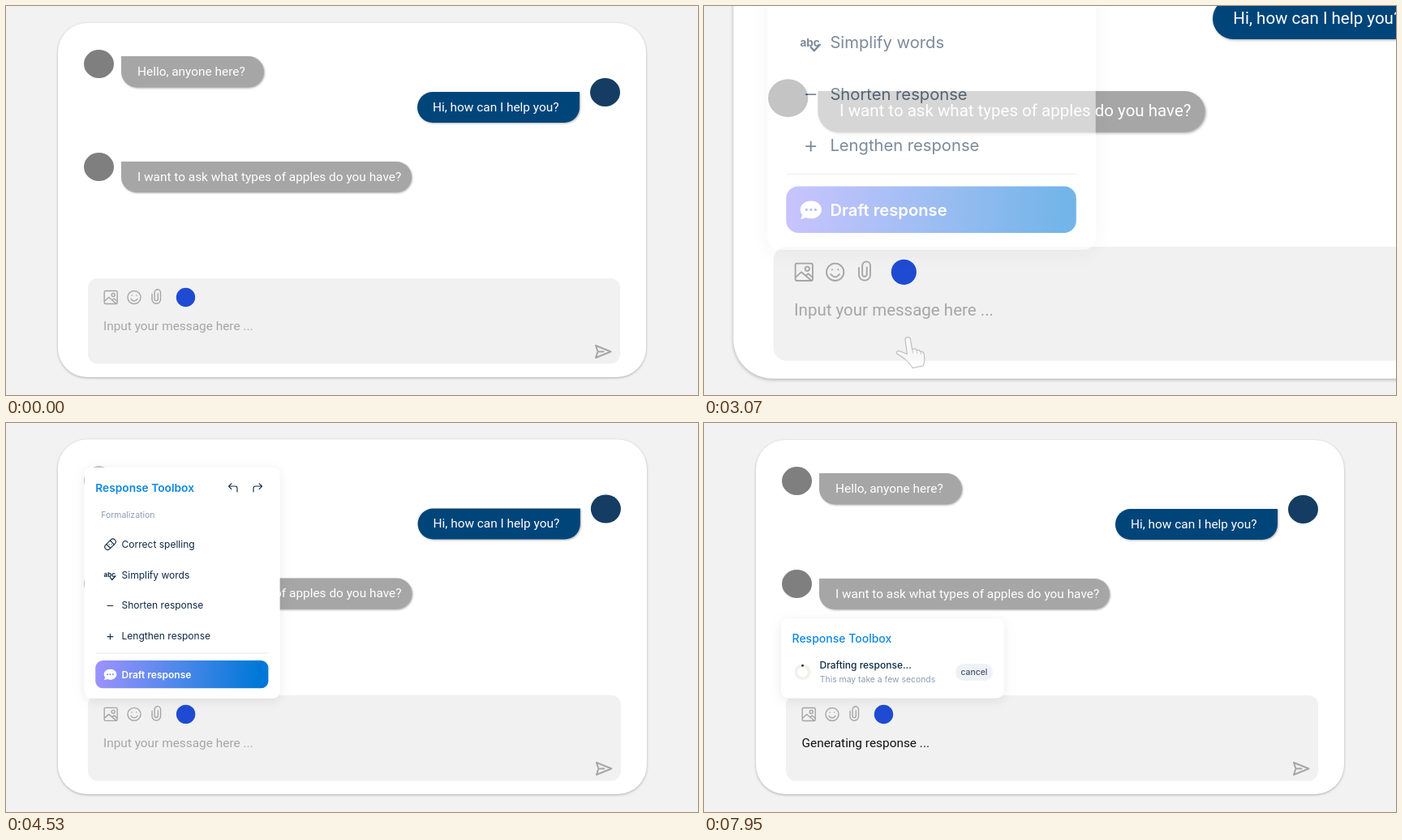
Animation, 853 px wide and 480 px high, one loop 8 s. Source, as an HTML page:

```html
<!DOCTYPE html>
<html lang="en">
<head>
<meta charset="utf-8">
<title>Response Toolbox</title>
<style>
  html, body { margin: 0; width: 100%; height: 100%; overflow: hidden; background: #f2f2f2; }
  svg { display: block; width: 853px; height: 480px; }
  .chat text { font: 15.4px Roboto, sans-serif; fill: #fff; }
  .chat .placeholder { fill: #a6a6a6; }
  .chat .generating { fill: #111; }
  .panel { fill: #fff; filter: drop-shadow(0 1px 1.5px rgba(0,0,0,.28)); }
  .bubble { filter: drop-shadow(1px 1px 1px rgba(0,0,0,.3)); }
  .icons { fill: none; stroke: #a6a6a6; stroke-width: 1.4; stroke-linecap: round; stroke-linejoin: round; }
  .popup { fill: #fff; filter: drop-shadow(0 3px 7px rgba(0,0,0,.08)); }
  .popup-text text { font: 12px Inter, sans-serif; fill: #0e2a45; }
  .popup-text .title { font-size: 13.7px; font-weight: 600; fill: #0f88e2; }
  .popup-text .label { font-size: 10.4px; fill: #8c9db3; }
  .popup-text .strong { font-weight: 600; fill: #fff; }
  .popup-text .medium { font-weight: 500; }
  .line { fill: none; stroke: #0e2a45; stroke-width: 1.1; stroke-linecap: round; stroke-linejoin: round; }
</style>
</head>
<body>
<svg viewBox="0 0 853 480">
  <defs>
    <linearGradient id="accent" gradientUnits="userSpaceOnUse" x1="112" y1="302" x2="310" y2="320">
      <stop offset="0" stop-color="#9b92fd"/>
      <stop offset=".5" stop-color="#4f88ea"/>
      <stop offset="1" stop-color="#0078d7"/>
    </linearGradient>
  </defs>

  <g id="chat" class="chat">
    <rect class="panel" x="64" y="21" width="725" height="437" rx="36"/>
    <g fill="#7f7f7f">
      <ellipse cx="114.5" cy="71.5" rx="18.5" ry="17.5"/>
      <ellipse cx="114.5" cy="198.5" rx="18.5" ry="17.5"/>
      <ellipse cx="738.5" cy="106.5" rx="18.5" ry="17.5" fill="#153d64"/>
    </g>
    <g id="bubbles"></g>

    <rect x="101" y="336" width="656" height="105.500" rx="12" fill="#f1f1f1"/>
    <g class="icons">
      <rect x="121.200" y="351.500" width="16" height="16" rx="1.5"/>
      <circle cx="132.200" cy="356.500" r="2"/>
      <path d="M121.700 364l5-4.500 9.500 8M130.700 363l2.500-2 4 3.500"/>
      <circle cx="158" cy="359.500" r="8"/>
      <path d="M154 361.500q4 5 8 0M155.200 357v.3M160.800 357v.3"/>
      <path d="M180 355.500v6.500a5 5 0 0 0 10.500 0v-8.500a3.700 3.700 0 0 0-7.400 0v8a2.100 2.100 0 0 0 4.200 0v-6.500"/>
      <path id="send" d="M727 419l18.500 7.500-18.500 7.500 2.500-7.500zM729.500 426.500h7" stroke-width="2"/>
    </g>
    <circle cx="221.500" cy="359.500" r="11.700" fill="#1f4bd2"/>
    <text id="placeholder" class="placeholder" x="120" y="400">Input your message here ...</text>
    <text id="generating" class="generating" x="120.500" y="400"></text>
  </g>

  <g id="menu" class="popup-text">
    <rect class="popup" x="96.500" y="55.500" width="240.500" height="284.500" rx="9"/>
    <text class="title" x="110.300" y="86">Response Toolbox</text>
    <path class="line" d="M277.500 75.500l-3.500 3.500 3.500 3.500M274 79h8q2.500 0 2.500 2.500v4.500M311.500 75.500l3.500 3.500-3.500 3.500M315 79h-8q-2.500 0-2.500 2.500v4.500"/>
    <text class="label" x="117.300" y="118">Formalization</text>
    <g id="rows"></g>
    <g class="line">
      <g transform="rotate(-45 128.500 150.500)">
        <rect x="120.500" y="147" width="16" height="7" rx="3.5"/>
        <path d="M125.300 147v7M131.700 147v7M127.500 149.500v.1M129.700 151.500v.1"/>
      </g>
      <path d="M128.500 191.500l2.300 2.500 4.200-4.500" stroke-width="1.4"/>
      <path d="M125 226h6.800M125 264h6.800M128.400 260.600v6.800"/>
    </g>
    <text x="120.500" y="191" style="font-size:8px;font-weight:700">abc</text>
    <path d="M110.500 284.300h212.500" stroke="#e3e7ec"/>
    <g id="draft">
      <rect x="110.300" y="293.300" width="212.500" height="34.200" rx="9" fill="url(#accent)"/>
      <path d="M128.500 304c4.500 0 7.800 2.900 7.800 6.500s-3.300 6.500-7.800 6.500q-2 0-3.600-.7l-4 1.200 1.300-3.200q-1.500-1.700-1.500-3.800c0-3.600 3.300-6.500 7.800-6.500z" fill="#fff"/>
      <path d="M125.200 310.500h.01M128.500 310.500h.01M131.800 310.500h.01" stroke="#6f8df3" stroke-width="2" stroke-linecap="round"/>
      <text class="strong" x="142.500" y="314.800">Draft response</text>
    </g>
  </g>

  <g id="card" class="popup-text">
    <rect class="popup" x="95" y="241" width="275" height="98.500" rx="9"/>
    <text class="title" x="108.500" y="271" style="font-weight:500;font-size:14px">Response Toolbox</text>
    <g id="spinner">
      <circle cx="121.500" cy="307.300" r="8" fill="none" stroke="#f1f1ea" stroke-width="3.6"/>
      <circle cx="121.500" cy="299.300" r="1.4" fill="#14181c"/>
    </g>
    <text class="medium" x="142.500" y="302.500">Drafting response...</text>
    <text class="label" x="142.800" y="320">This may take a few seconds</text>
    <rect x="310" y="297" width="46" height="21" rx="10.500" fill="#eef2f7"/>
    <text class="label medium" x="316.500" y="311" style="fill:#44546b">cancel</text>
  </g>

  <g id="overlay">
    <g id="cursor">
      <path fill="#fff" stroke="#858585" stroke-linejoin="round" d="M-2.500 2Q-2.500-1 .2-1T3 2L4.500 11Q8 10 9 12Q12 11.500 12.800 13.500Q16 13 16.500 16L17 22Q17 25 15.500 28L5 30Q3 26-4 20L-11 15.500Q-11.500 12.500-8 13L-.5 16Z"/>
      <path fill="none" stroke="#8c8c8c" stroke-width=".8" d="M4.500 11l.8 4M9 12l.7 3.500M12.800 13.500l.6 3"/>
    </g>
  </g>
</svg>

<script>
const LOOP = 8000, TICK = 60;
const $ = id => document.getElementById(id);
const place = (id, transform) => $(id).setAttribute('transform', transform);
const fade = (id, opacity) => $(id).setAttribute('opacity', opacity);
const mix = (a, b, k) => a + (b - a) * k;

// Bubbles have one square top corner, on the side of their avatar.
function bubble(x, y, w, h, textX, text, own) {
  const r = h / 2;
  const path = `M0 0H${w - r}a${r} ${r} 0 0 1 0 ${h}H${r}A${r} ${r} 0 0 1 0 ${r}Z`;
  const flip = own ? `translate(${x + w} ${y}) scale(-1 1)` : `translate(${x} ${y})`;
  return `<g class="bubble"><path d="${path}" transform="${flip}" fill="${own ? '#00457a' : '#a6a6a6'}"/></g>
    <text x="${textX}" y="${y + h / 2 + 4.5}">${text}</text>`;
}
$('bubbles').innerHTML =
  bubble(142, 62, 176, 38.5, 162, 'Hello, anyone here?') +
  bubble(507, 106, 200, 38, 526, 'Hi, how can I help you?', true) +
  bubble(142, 192, 358, 38, 162, 'I want to ask what types of apples do you have?');
$('rows').innerHTML = ['Correct spelling', 'Simplify words', 'Shorten response', 'Lengthen response']
  .map((text, i) => `<text x="142.500" y="${154.6 + i * 37.7}">${text}</text>`).join('');

// Eased progress that advances once per tick, over the given number of ticks.
function progress(t, start, ticks) {
  const x = Math.min(1, Math.max(0, (Math.floor((t - start) / TICK) + 1) / ticks));
  return 1 - (1 - x ** 1.34) ** 3;
}

function drawCursor(t) {
  const first = t < 5000;
  const visit = first
    ? { enter: 2050, leave: 2890, x: 225, y: 361.5, dx: 55, dy: 122, size: .92 }
    : { enter: 5110, leave: 6020, x: 259, y: 319, dx: 72, dy: 170, size: 1 };
  const enter = progress(t, visit.enter, 14), leave = progress(t, visit.leave, 12);
  const x = visit.x + visit.dx * (1 - enter);
  const y = visit.y + visit.dy * (1 - enter) + 109 * leave;
  place('cursor', `translate(${x} ${y}) scale(${visit.size})`);
  fade('cursor', enter > 0 ? 1 - leave : 0);
}

function draw(t) {
  const zoom = progress(t, 1130, 12) - progress(t, 3750, 16);
  const camera = `translate(${-49 * zoom} ${-151 * zoom}) scale(${1 + zoom / 3})`;
  place('chat', camera);
  place('overlay', camera);
  fade('send', Math.max(0, 1 - 3 * zoom));

  const drafting = progress(t, 6020, 12);
  place('menu', `translate(${mix(96.5, 78, zoom)} ${mix(340, 301, zoom)}) scale(${mix(1, 1.683, zoom)}) translate(-96.5 -340)`);
  fade('menu', progress(t, 2890, 12) - drafting);
  const hover = 1 + .01 * progress(t, 5110, 14);
  place('draft', `translate(217 310.5) scale(${hover}) translate(-217 -310.5)`);

  fade('card', drafting);
  const now = Math.floor((t - 6870) / TICK) * TICK;
  place('spinner', `rotate(${(now - 1080) / 1140 * 360} 121.5 307.3)`);

  fade('placeholder', 1 - drafting);
  fade('generating', drafting);
  const dots = t < 6870 ? 3 : Math.floor((t - 6870) / 300) % 4;
  $('generating').textContent = 'Generating response ' + '.'.repeat(dots);

  drawCursor(t);
}

function frame() {
  draw(performance.now() % LOOP);
  requestAnimationFrame(frame);
}
frame();
</script>
</body>
</html>
```
